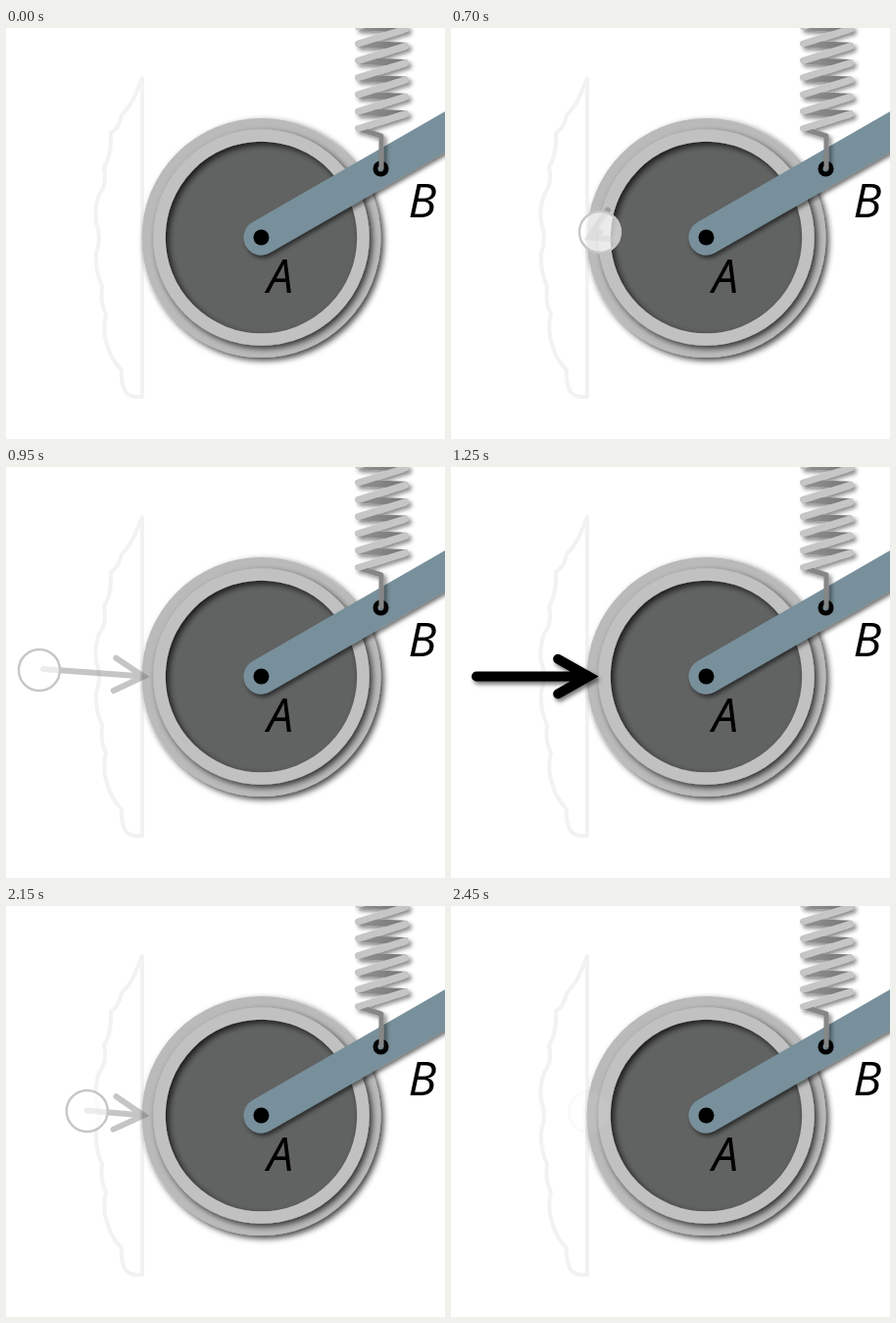
An HTML page for the animation above (2500 ms loop, 448 by 419 pixels).

```html
<!DOCTYPE html>
<html lang="en">
<head>
<meta charset="utf-8">
<title>Force on a disc</title>
<style>
html, body { margin: 0; width: 100%; height: 100%; overflow: hidden; background: #fff; }
svg { display: block; width: 448px; height: 419px; }
text { font: italic 48px "Open Sans", "Noto Sans", sans-serif; }
.line { fill: none; stroke-linecap: round; }
#arrow { stroke: #606060; opacity: .36; }
#arrow.placed { stroke: #000; opacity: 1; filter: url(#soft); }
</style>
</head>
<body>
<svg viewBox="0 0 448 419">
  <defs>
    <filter id="soft" filterUnits="userSpaceOnUse" x="-20" y="-20" width="560" height="480">
      <feDropShadow dx="2" dy="3" stdDeviation="2" flood-opacity=".55"/>
    </filter>
    <filter id="wide" filterUnits="userSpaceOnUse" x="-20" y="-20" width="560" height="480">
      <feDropShadow dx="3" dy="3" stdDeviation="3" flood-opacity=".75"/>
    </filter>
    <filter id="coil" filterUnits="userSpaceOnUse" x="300" y="-60" width="180" height="260">
      <feDropShadow dx="3" dy="3" stdDeviation="2" flood-opacity=".45"/>
    </filter>
    <linearGradient id="back">
      <stop offset="0" stop-color="#929292"/>
      <stop offset="1" stop-color="#767676"/>
    </linearGradient>
  </defs>

  <path class="line" stroke="#f2f2f2" stroke-width="4" stroke-linejoin="round"
    d="M139 51V376Q124 377 121 369Q117 360 118 349Q106 336 103 322Q98 308 102 291Q96 282 98 263Q91 248 92 230Q98 214 92 198Q90 185 95 170Q104 158 100 142Q108 130 107 107Q115 103 118 89Q128 78 132 68Z"/>

  <circle cx="260.5" cy="214" r="122" fill="#bababa" filter="url(#wide)"/>
  <circle cx="260.5" cy="213.5" r="100" fill="#616262"/>
  <circle cx="260.5" cy="213.5" r="104" fill="none" stroke="#c1c1c1" stroke-width="12.5" filter="url(#wide)"/>

  <path class="line" stroke="#78909b" stroke-width="36" d="M260.5 213.5L500 76" filter="url(#soft)"/>
  <circle cx="260.5" cy="213.5" r="8" fill="#000"/>
  <circle cx="382.5" cy="143.5" r="5.5" fill="#78909b" stroke="#000" stroke-width="5"/>
  <g id="spring" filter="url(#coil)">
    <path class="line" stroke="#868686" stroke-width="5" stroke-linejoin="round" d="M361 103L383 110V142"/>
  </g>

  <text x="266.5" y="270">A</text>
  <text x="410.5" y="193">B</text>

  <path id="arrow" class="line" stroke-miterlimit="6"/>
  <circle id="touch" r="21" fill="#fff" fill-opacity=".68" stroke="#c6c6c6" stroke-width="2.4"/>
</svg>
<script>
const get = id => document.getElementById(id);
const spring = get('spring'), arrow = get('arrow'), touch = get('touch');
const LOOP = 2500, STEP = 50, HEAD = { x: 140.5, y: 213.5 };

function addCoil(d, color, width) {
  const p = document.createElementNS('http://www.w3.org/2000/svg', 'path');
  const attrs = { d, class: 'line', stroke: color, 'stroke-width': width };
  for (const name in attrs) p.setAttribute(name, attrs[name]);
  spring.append(p);
}
const levels = Array.from({ length: 7 }, (_, i) => 102.5 - i * 17.3);
levels.forEach(y => addCoil(`M361 ${y - 17}L407 ${y - 15}`, 'url(#back)', 7));
levels.forEach(y => addCoil(`M359.5 ${y}L407.5 ${y - 15}`, '#c6c6c6', 7));

const clamp = v => Math.max(0, Math.min(1, v));
const ease = v => (1 - Math.cos(Math.PI * clamp(v))) / 2;
const mix = (a, b, k) => a + (b - a) * k;

function drawArrow(tail, width, wing) {
  const back = Math.atan2(tail.y - HEAD.y, tail.x - HEAD.x);
  const end = side => {
    const a = back + side * 0.515;
    return `${HEAD.x + wing * Math.cos(a)} ${HEAD.y + wing * Math.sin(a)}`;
  };
  const head = `${HEAD.x} ${HEAD.y}`;
  arrow.setAttribute('d', `M${tail.x} ${tail.y}L${head}M${end(1)}L${head}L${end(-1)}`);
  arrow.setAttribute('stroke-width', width);
}

function drawTouch(x, y, opacity) {
  touch.setAttribute('cx', x);
  touch.setAttribute('cy', y);
  touch.setAttribute('opacity', opacity);
}

function render(t) {
  const drawing = t < 1600;
  const k = drawing ? ease((t - 700) / 250) : ease((t - 2050) / 200);
  const x = drawing ? mix(152, 34, k) : mix(24, 141.5, k);
  const y = drawing ? mix(208, 207, k) : mix(208, 210, k);
  const dragging = drawing ? t >= 700 && t <= 950 : t >= 2050 && t <= 2250;
  const placed = t > 950 && t < 2050;
  const lag = drawing ? 4 * k : 0;

  arrow.classList.toggle('placed', placed);
  arrow.style.display = placed || dragging ? '' : 'none';
  if (placed) drawArrow({ x: 26, y: HEAD.y }, 10, 36);
  else drawArrow({ x: x + lag, y: y - k }, 6, 34);

  let alpha = 0;
  if (dragging) alpha = 1;
  else if (t > 950 && t < 1150) alpha = 1 - (t - 950) / 200;
  else if (t > 2250) alpha = clamp(1 - (t - 2250) / 220);
  drawTouch(x, y, alpha);
}

const start = performance.now();
function tick() {
  const t = (performance.now() - start) % LOOP;
  render(Math.floor(t / STEP) * STEP);
  requestAnimationFrame(tick);
}
tick();
</script>
</body>
</html>
```
